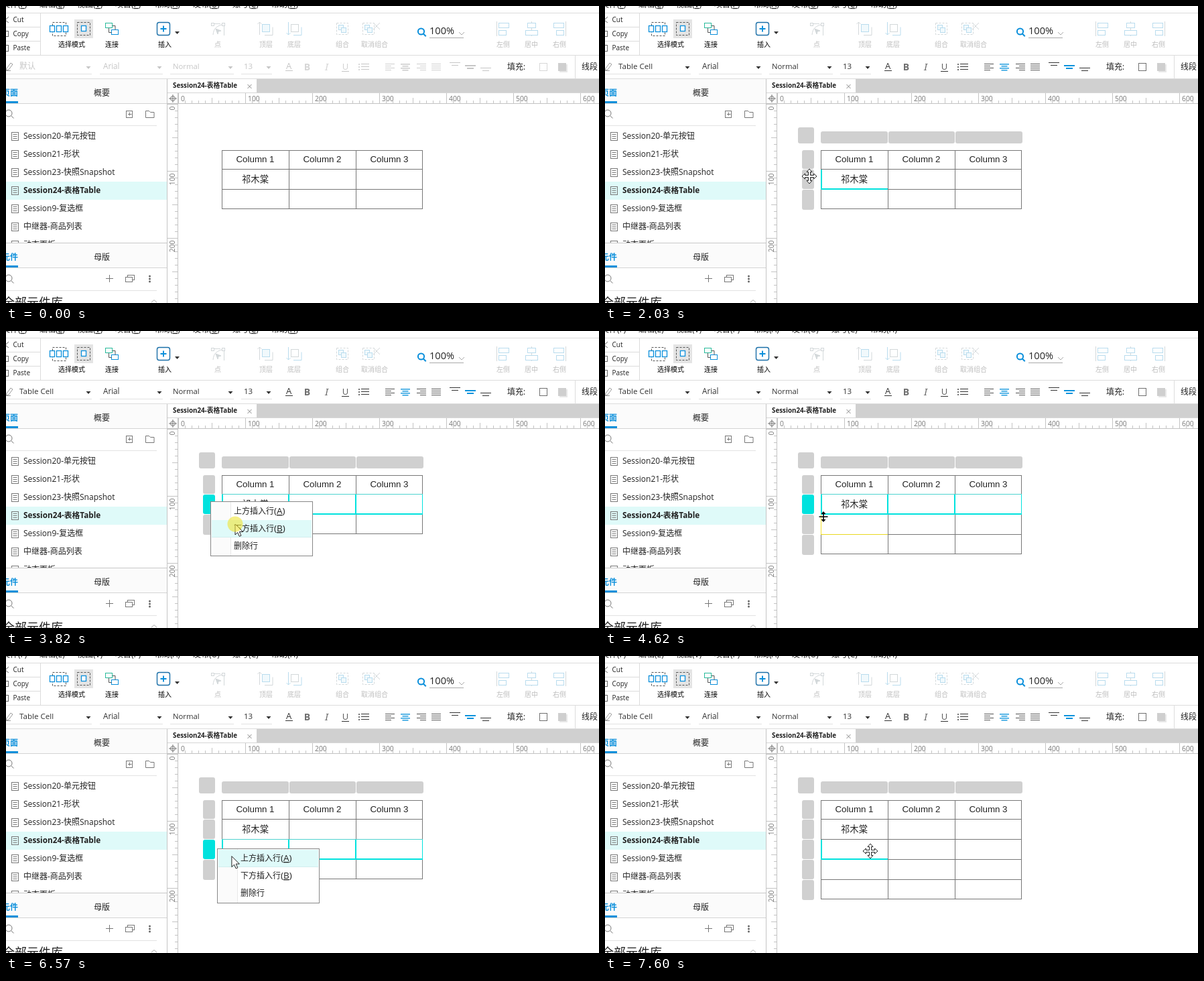
An HTML page that plays this animation: 885 px wide and 443 px high, repeating every 8000 ms.

```html
<!DOCTYPE html>
<html lang="zh">
<head>
<meta charset="utf-8">
<style>
html, body { margin: 0; width: 100%; height: 100%; overflow: hidden; background: #fff; }
svg { display: block; font-family: 'Open Sans', 'Noto Sans CJK SC', 'Noto Sans CJK', sans-serif; }
text { white-space: pre; }
.cell { font-family: 'Liberation Sans', 'Noto Sans CJK SC', 'Noto Sans CJK', sans-serif; font-size: 13.33px; }
#fmt { color: #c6c6c6; --hi: #c6c6c6; }
#fmt.on { color: #333; --hi: #0a93dc; }
#bar.keys tspan { text-decoration: underline; }
</style>
</head>
<body>
<svg width="885" height="443" viewBox="0 0 885 443">
  <defs><clipPath id="list"><rect y="180" width="240" height="173"/></clipPath></defs>
  <g id="still"></g>
  <g id="bar"></g>
  <g id="fmt"></g>
  <g id="live"></g>
</svg>
<script>
const BLUE = '#0a8fdb', CYAN = '#00e2de', GREY = '#d0d0d0', INK = '#222', DIM = '#bdbdbd', PALE = '#b9dcee', SOFT = '#d3d8da';
const $ = id => document.getElementById(id);
const rect = (x, y, w, h, fill, extra = '') => `<rect x="${x}" y="${y}" width="${w}" height="${h}" fill="${fill}" ${extra}/>`;
const box = (x, y, w, h, stroke, fill = 'none', extra = '') => rect(x + .5, y + .5, w, h, fill, `stroke="${stroke}" ${extra}`);
const path = (d, stroke, w = 1, fill = 'none', extra = '') => `<path d="${d}" fill="${fill}" stroke="${stroke}" stroke-width="${w}" ${extra}/>`;
const text = (x, y, s, size = 12, fill = INK, extra = '') => `<text x="${x}" y="${y}" font-size="${size}" fill="${fill}" ${extra}>${s}</text>`;
const mid = (x, y, s, size, fill, extra = '') => text(x, y, s, size, fill, 'text-anchor="middle" ' + extra);
const hline = (x, y, w, fill) => rect(x, y, w, 1, fill);
const vline = (x, y, h, fill) => rect(x, y, 1, h, fill);
const tri = (x, y, fill) => `<path d="M${x - 3.5} ${y}h7l-3.5 4z" fill="${fill}"/>`;
const lens = (x, y, r, c, w) => `<circle cx="${x}" cy="${y}" r="${r}" fill="none" stroke="${c}" stroke-width="${w}"/>`
  + path(`M${x + r * .7} ${y + r * .7}l4 4`, c, w);

function mainBar() {
  let s = hline(0, 10, 885, '#dcdcdc') + hline(0, 73, 885, '#dcdcdc') + vline(51, 10, 63, '#dcdcdc')
    + hline(0, 31, 51, '#dcdcdc') + hline(0, 52, 51, '#dcdcdc');
  ['Cut', 'Copy', 'Paste'].forEach((n, i) => s += text(10.5, 24 + 21 * i, n, 10));
  s += path('M4 16L-1 21L4 25', '#666') + box(-3, 37, 6, 8, '#666') + box(-3, 58, 6, 9, '#666');
  // selection modes
  s += box(69, 24, 20, 20, '#555', 'none', 'stroke-dasharray="3 2"');
  for (let x = 65; x < 90; x += 10) s += box(x, 29, 7, 9, BLUE, '#fff', 'stroke-width="1.3"');
  s += rect(102, 20, 28, 28, '#e4e4e4') + box(106, 24, 19, 19, '#555', 'none', 'stroke-dasharray="3 2"')
    + box(112, 29, 7, 8, BLUE, '#fff', 'stroke-width="1.3"');
  s += box(148, 25, 10, 7, '#27b99a') + box(157, 35, 10, 7, BLUE) + path('M153.5 33v6.5h4M159 29.5h4v6', '#555');
  s += box(225, 24, 19, 19, '#1b6fa8', '#fff', 'rx="3" stroke-width="1.4"') + path('M235 29.5v9M230.5 34h9', BLUE, 2) + tri(255.5, 38, '#333');
  // point
  s += path('M309 43C310 33 314 30 325 27M307 26.5h13M325.5 30v14', SOFT) + box(306, 25, 4, 4, SOFT, '#fff')
    + box(322, 25, 4, 4, SOFT, '#fff') + path('M313 34l8 3-4 1-1 4z', SOFT, 1, SOFT);
  // layers
  [377, 420].forEach((x, i) => {
    s += box(x + 5, 27, 11, 11, i ? SOFT : PALE, i ? '#fff' : '#f1f9fc') + path(`M${x + 1.5} 24v19M${x + 9} 43.5h12v-12`, i ? PALE : SOFT)
      + path(i ? `M${x - 1.5} 40l3 3 3-3` : `M${x - 1.5} 27l3-3 3 3`, i ? PALE : SOFT);
  });
  // groups
  [493, 532].forEach((x, i) => {
    s += box(x, 25, 17, 17, SOFT, 'none', 'stroke-dasharray="3 2"') + box(x + 3, 28, 7, 7, PALE, '#f1f9fc') + box(x + 7, 32, 7, 7, PALE, '#f1f9fc');
    if (i) s += path(`M${x + 16} 25l10 10M${x + 26} 25l-10 10`, SOFT);
  });
  // aligning
  [732, 774, 816].forEach((x, i) => {
    s += vline(x + [0, 10, 19][i], 23, 22, SOFT) + box(x + [3, 4, 1][i], 25, i === 1 ? 12 : 15, 7, PALE, '#fff')
      + box(x + [3, 1, 5][i], 36, i === 1 ? 18 : 11, 7, PALE, '#fff');
  });
  [[98, '选择模式', 1], [158, '连接', 1], [237, '插入', 1], [316, '点'], [388, '顶层'], [430, '底层'], [502, '组合'],
    [550, '取消组合'], [742, '左侧'], [784, '居中'], [826, '右侧']]
    .forEach(([x, n, on]) => s += mid(x, 61, n, 10, on ? '#000' : DIM));
  s += lens(619.5, 38, 4.6, BLUE, 2) + text(632, 42, '100%', 14.6) + hline(632, 47, 51, '#aaa') + path('M676 39l4 4 4-4', '#aaa');
  return s;
}

function panel() {
  let s = rect(0, 109, 240, 36, '#fbfbfb') + rect(0, 354, 240, 36, '#fbfbfb') + hline(0, 108, 885, '#dcdcdc');
  [[134, '页面', '概要'], [379, '元件', '母版']].forEach(([y, a, b]) =>
    s += text(-6, y, a, 12, BLUE, 'font-weight="700"') + text(131, y, b) + hline(0, y + 11, 240, '#d4d4d4') + rect(0, y + 8, 18, 3, BLUE));
  s += lens(4, 160, 5, '#777', 1) + hline(0, 178, 225, '#e2e2e2') + box(179, 156, 9, 10, '#777')
    + path('M184.5 158.5v5M182 161.5h5.5', '#777') + path('M208.5 166.5v-10h5l2 2h5.5v8z', '#777');
  s += rect(0, 262, 240, 27, '#dffaf9') + '<g clip-path="url(#list)">';
  ['Session20-单元按钮', 'Session21-形状', 'Session23-快照Snapshot', 'Session24-表格Table', 'Session9-复选框', '中继器-商品列表', '动态面板']
    .forEach((n, i) => {
      const y = 198 + 27 * i;
      s += text(26, y, n, i === 3 ? 11.75 : 12, INK, i === 3 ? 'font-weight="700"' : '') + box(8, y - 10, 10, 12, '#777')
        + path(`M10.5 ${y - 6.5}h6M10.5 ${y - 3.5}h6M10.5 ${y - .5}h6`, '#777');
    });
  s += '</g>' + hline(0, 353, 240, '#c8c8c8') + lens(4, 406, 5, '#777', 1) + path('M154.5 401v11M149 406.5h11', '#777')
    + box(181, 401, 10, 7, '#777') + box(178, 404, 10, 7, '#777', '#fff');
  for (let y = 403; y < 412; y += 4) s += `<circle cx="214.5" cy="${y}" r="1.5" fill="#666"/>`;
  return s + hline(0, 424, 225, '#e2e2e2') + text(-5, 449, '全部元件库', 18) + path('M217 442l4-3.5 4 3.5', '#aaa') + vline(240, 109, 334, '#c4c4c4');
}

function rulers() {
  let s = rect(241, 109, 644, 20, GREY) + rect(241, 109, 133, 20, '#fff') + text(249, 122, 'Session24-表格Table', 9.8, INK, 'font-weight="700"')
    + path('M360.5 117l6 6M366.5 117l-6 6', '#888') + hline(241, 129, 644, '#d6d6d6')
    + hline(241, 145, 644, '#c4c4c4') + vline(256, 130, 313, '#c4c4c4')
    + '<circle cx="249" cy="138" r="3.5" fill="none" stroke="#777"/>' + path('M249 132v12M243 138h12', '#777');
  for (let i = 0; i < 63; i++) {
    const big = i % 10 === 0, len = big ? 15 : i % 5 ? 4 : 8, p = 10 * i;
    s += vline(257 + p, 145 - len, len, '#c4c4c4');
    if (p < 297) s += hline(256 - len, 146 + p, len, '#c4c4c4');
    if (big) s += text(261 + p, 142, p, 10.3, '#777');
    if (big && p < 297) s += text(0, 0, p, 10.3, '#777', `text-anchor="end" transform="translate(252 ${149.5 + p}) rotate(-90)"`);
  }
  return s;
}

function menuBar() {
  return [[-6, '文件', 'F'], [50, '编辑', 'E'], [106, '视图', 'V'], [163, '项目', 'P'], [221, '布局', 'A'], [279, '发布', 'U'], [338, '账号', 'C'], [396, '帮助', 'H']]
    .map(([x, n, k]) => text(x, 2, `${n}(<tspan>${k}</tspan>)`)).join('');
}

function formatBar() {
  const c = 'currentColor', hi = 'var(--hi)';
  let s = path('M0 96.5h7M1 93l6-8 3 2-6 8-4 1z', '#999') + '<g id="style"></g>'
    + text(145, 94, 'Arial', 11.7, c) + text(249, 94, 'Normal', 11.3, c) + text(355, 94, '13', 11.5, c);
  [[0, 123], [140, 229], [245, 335], [351, 392]].forEach(([x, t]) => s += tri(t, 90, c) + hline(x, 101, t + 5 - x, '#e2e2e2'));
  s += mid(422, 94, 'A', 13, c) + hline(417, 96, 11, c) + mid(449.5, 96, 'B', 14, c, 'font-weight="700" opacity=".7"')
    + mid(478.5, 96, 'I', 14, c, 'font-style="italic" font-family="Noto Serif, serif" opacity=".7"')
    + mid(506.5, 95, 'U', 13, c, 'opacity=".8"') + hline(501, 97, 11, c);
  for (let y = 86; y < 97; y += 4) s += rect(526, y, 2, 2, c, 'opacity=".7"') + rect(530, y, 12, 1, c);
  [566, 589, 613, 635].forEach((x, i) => {
    for (let k = 0; k < 4; k++) {
      const w = k % 2 && i < 3 ? 9 : 14, pad = (14 - w) * i / 2;
      s += rect(x + pad, 86 + 3 * k, w, i === 1 ? 1.6 : 1, i === 1 ? hi : c, 'opacity=".85"');
    }
  });
  [662, 685, 708].forEach((x, i) => {
    const y = [84, 88, 92][i];
    s += rect(x, y, 16, i === 1 ? 2 : 1, i === 1 ? hi : c) + rect(x + 3, y + 4, 10, i === 1 ? 2 : 1, i === 1 ? hi : c);
  });
  return s + text(748, 95, '填充:') + box(796, 85, 11, 11, c, 'none', 'opacity=".7"') + rect(826, 87, 12, 12, '#e8e8e8') + rect(824, 85, 12, 12, '#cfcfcf')
    + vline(849, 73, 36, '#dcdcdc') + text(859, 95, '线段');
}

$('still').innerHTML = mainBar() + panel() + rulers();
$('bar').innerHTML = menuBar();
$('fmt').innerHTML = formatBar();

// pointer stops: time, x, y
const stops = [[310, 718, 430], [850, 412, 266], [1000, 412, 266], [1170, 413, 267], [1250, 413, 267], [1790, 323, 256], [1860, 323, 256],
  [2030, 305, 254], [3040, 305, 254], [3100, 327, 262], [3190, 327, 262], [3250, 334, 266], [3340, 334, 266], [3670, 342, 288],
  [4370, 342, 288], [4620, 326, 277], [4690, 326, 277], [5170, 315, 287], [6400, 315, 287], [6650, 347, 304],
  [6900, 347, 304], [7060, 390, 306], [7150, 390, 306], [7380, 396, 291]];
const kinds = [[310, 'arrow'], [700, 'move'], [1100, 'plus'], [1620, 'move'], [2570, 'arrow'], [3900, 'move'], [4540, 'size'],
  [4800, 'move'], [6420, 'arrow'], [6820, 'move']];
const clicks = [[1000, 1080], [2330, 2490], [3820, 3900], [5260, 5330], [5870, 6040], [6740, 6820], [7530, 7600]];
const hovers = [[730, 1080, 1], [4300, 4900, 2], [6900, 7600, 2]];
// selection: time, row, whole row
const picks = [[0, 0, 0], [1080, 1, 0], [2490, 1, 1], [5330, 2, 1], [6820, 3, 1], [7600, 2, 0]];
const last = (list, t) => list.filter(e => e[0] <= t).pop();
const within = ([a, b], t) => t >= a && t < b;

const head = 'M0-11l4 4.5h-2.5v5h5V-4L11 0l-4.5 4V1.5h-5v5H4L0 11l-4-4.5h2.5v-5h-5V4L-11 0l4.5-4v2.5h5v-5H-4z';
const shapes = {
  arrow: path('M0 0V16l3.7-3.5 2.6 5.8 2.6-1.1-2.5-5.7h5.1z', '#222', 1, '#fff'),
  move: path(head, '#222', 1, '#fff'),
  plus: path('M-2.5-6.5h5v4h4v5h-4v4h-5v-4h-4v-5h4z', '#000', 1.5, '#fff'),
  size: path('M-6.5 0h13M0-6v12', '#000', 1.6) + '<path d="M-3.5-4L0-8l3.5 4zM-3.5 4L0 8l3.5-4z"/>'
};

function place(t) {
  const i = stops.findIndex(s => s[0] > t);
  if (i < 0) return stops[stops.length - 1].slice(1);
  const a = stops[i - 1], b = stops[i], k = (t - a[0]) / (b[0] - a[0]);
  return [a[1] + (b[1] - a[1]) * k, a[2] + (b[2] - a[2]) * k];
}

const rowTop = r => r ? 213 + 30 * r : 215;

function table(t) {
  const rows = t < 3900 ? 3 : t < 6820 ? 4 : 5, end = 212 + 30 * rows;
  const [, row, whole] = last(picks, t);
  let s = '';
  if (row) {
    s += rect(288, 181, 24, 24, GREY, 'rx="3"');
    [322, 423, 523].forEach((x, i) => s += rect(x, 187, i === 1 ? 99 : 100, 18, GREY, 'rx="3"'));
    for (let r = 0; r < rows; r++) {
      const h = r === 0 ? 28 : r === rows - 1 ? 30 : 29;
      s += rect(294, rowTop(r) + (r ? 1 : 0), 18, h, whole && r === row ? CYAN : GREY, 'rx="3"');
    }
  }
  for (let r = 0; r <= rows; r++) s += hline(322, r === rows ? end : rowTop(r), 300, '#777');
  for (let c = 0; c < 4; c++) s += vline(c === 3 ? 621 : 322 + 100 * c, 215, end - 214, '#777');
  if (row) {
    const y = rowTop(row), w = whole ? 300 : 100;
    s += rect(322, y + 1, 2, 29, CYAN) + rect(322, y + 29, w, 2, CYAN);
    if (whole) s += rect(421, y + 1, 2, 29, CYAN) + rect(521, y + 1, 2, 29, CYAN) + vline(621, y, 30, CYAN) + hline(322, y, 300, '#4fd3d0');
  }
  const h = hovers.find(h => within(h, t));
  if (h) {
    const y = rowTop(h[2]);
    if (t > 6000) s += hline(323, y, 99, '#d2d2d2');
    s += vline(322, y + 1, 29, '#f4e030') + hline(322, y + 30, 100, '#e8d820');
  }
  for (let c = 0; c < 3; c++) s += mid(372 + 100 * c, 233, 'Column ' + (c + 1), 13.33, '#222', 'class="cell"');
  return s + mid(372, 262.5, '祁木棠', 13.33, INK, 'class="cell"');
}

function menu(x, y, lit) {
  let s = box(x, y, 152, 81, '#888', '#fff') + rect(x + 1, y + 1, 29, 80, '#fbfbfb') + vline(x + 30, y + 1, 80, '#e8e8e8');
  if (lit >= 0) s += rect(x + 2, y + 2 + 26 * lit, 149, 26, '#dffaf9') + hline(x + 2, y + 27 + 26 * lit, 149, '#d2eeee');
  [['上方插入行', 'A'], ['下方插入行', 'B'], ['删除行']].forEach(([n, k], i) =>
    s += text(x + 35, y + 19 + 26 * i, n + (k ? `<tspan font-size="13.5">(<tspan text-decoration="underline">${k}</tspan>)</tspan>` : '')));
  return s;
}

function pointer(t) {
  if (t < 310) return '';
  const at = place(t), spot = `transform="translate(${at[0]} ${at[1]})"`;
  let s = `<g ${spot}>${shapes[last(kinds, t)[1]]}</g>`;
  if (clicks.some(c => within(c, t))) s += `<circle r="11.5" fill="#efe53a" opacity=".62" ${spot}/>`;
  return s;
}

function draw(t) {
  const on = t >= 1080;
  $('bar').setAttribute('class', t < 3900 ? 'keys' : '');
  $('fmt').setAttribute('class', on ? 'on' : '');
  $('style').innerHTML = text(20, 94, on ? 'Table Cell' : '默认', on ? 11.6 : 12, 'currentColor');
  let s = table(t);
  if (within([2570, 3900], t)) s += menu(305, 254, t < 3050 ? -1 : t < 3560 ? 0 : 1);
  if (within([6110, 6820], t)) s += menu(315, 287, t < 6500 ? -1 : 0);
  if (within([6950, 7310], t)) s += `<g opacity=".5">${box(348, 330, 98, 21, '#666', '#fff')}${text(354, 345, '上方插入行<tspan font-size="13">(&amp;A)</tspan>', 12, '#444')}</g>`;
  $('live').innerHTML = s + pointer(t);
}

const start = performance.now();
function tick() {
  draw((performance.now() - start) % 8000);
  requestAnimationFrame(tick);
}
tick();
</script>
</body>
</html>
```
